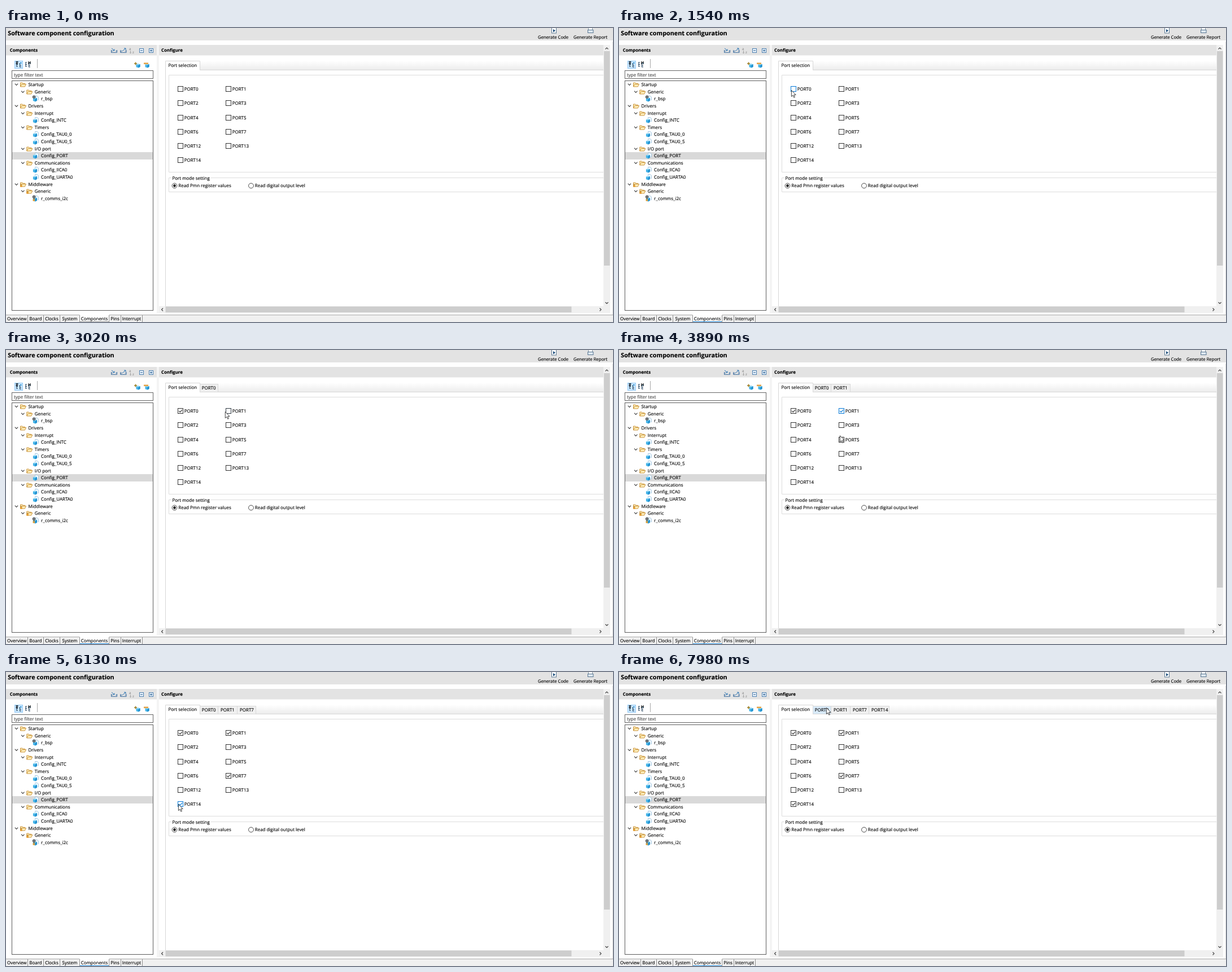
Animation of 1075x521 px, one loop 8 s. Source, as an HTML page:

```html
<!DOCTYPE html>
<html lang="en">
<head>
<meta charset="utf-8">
<title>Software component configuration</title>
<style>
html, body { margin: 0; width: 100%; height: 100%; overflow: hidden; background: #fff; }
svg { display: block; width: 100vw; height: 100vh; }
text { font: 7.95px "Open Sans", "Noto Sans", sans-serif; fill: #000; stroke: #000; stroke-width: .14px; text-rendering: geometricPrecision; white-space: pre; }
text.title { font-size: 10.8px; font-weight: 700; }
text.head { font-size: 7.8px; font-weight: 700; }
text.tool { font-size: 7.75px; }
text.mid { text-anchor: middle; }
text.hint { fill: #444; stroke: #444; }
text.sort { font-size: 6px; fill: #777; stroke: none; }
</style>
</head>
<body>
<svg id="stage" viewBox="0 0 1075 521" xmlns="http://www.w3.org/2000/svg">
  <defs>
    <linearGradient id="strip" x2="0" y2="1">
      <stop stop-color="#fff"/><stop offset="1" stop-color="#ececec"/>
    </linearGradient>
    <g id="folder" fill="#fff0bd" stroke="#c58a2b" stroke-width=".9" stroke-linejoin="round">
      <path d="M.5 8.5V1.5H4L5 2.8H8.7V4.2"/>
      <path d="M.5 8.5L2.8 4.2H10.5L8.4 8.5Z"/>
    </g>
    <g id="cube">
      <path d="M0 1.6L3.4 .2L7 1.2V6L3.8 7.6L0 6.2Z" fill="#45b4e8"/>
      <path d="M0 1.6L3.4 .2L7 1.2L3.8 2.8Z" fill="#a3dff8"/>
      <path d="M3.8 2.8L7 1.2V6L3.8 7.6Z" fill="#1f8fcf"/>
    </g>
    <g id="part">
      <path d="M3.6 2.2V.6H7.4L9.4 2.4V7.4H8" fill="#fff" stroke="#7fb2d6" stroke-width=".8"/>
      <use href="#cube" y="2.8"/>
    </g>
    <g id="tree" fill="none" stroke="#24435f" stroke-width="1">
      <path d="M1 1H4M1 4.5H4M1 8H4M2 1V8M6 3H7.5V9.5M7.5 6H10M7.5 9H10"/>
      <path d="M8 2H10.5" stroke="#2b8fd0" stroke-width="2"/>
    </g>
    <path id="tray" d="M.5 4V8.5H10.5V4M.5 8.5V6H3M10.5 6H8" fill="none" stroke="#3f6f9f"/>
  </defs>
  <g id="base"></g>
  <g id="tabs"></g>
  <g id="ports"></g>
  <path id="cursor" d="M.4 .4V11.5L3 9.2L4.8 13.2L6.5 12.4L4.8 8.5H8.2Z" fill="#fff" stroke="#222" stroke-width=".85"/>
</svg>
<script>
const LOOP = 8000;
const $ = id => document.getElementById(id);
const text = (x, y, s, cls = '') => `<text x="${x}" y="${y}" class="${cls}">${s}</text>`;
const rect = (x, y, w, h, fill, stroke = 'none') =>
  `<rect x="${x}" y="${y}" width="${w}" height="${h}" fill="${fill}" stroke="${stroke}"/>`;
const line = (d, stroke, width = 1) =>
  `<path d="${d}" fill="none" stroke="${stroke}" stroke-width="${width}"/>`;
const use = (id, x, y) => `<use href="#${id}" x="${x}" y="${y}"/>`;

// depth, label, marker
const TREE = [
  [0, 'Startup'], [1, 'Generic'], [2, 'r_bsp', 'info'],
  [0, 'Drivers'], [1, 'Interrupt'], [2, 'Config_INTC'],
  [1, 'Timers'], [2, 'Config_TAU0_0'], [2, 'Config_TAU0_5'],
  [1, 'I/O port'], [2, 'Config_PORT', 'selected'],
  [1, 'Communications'], [2, 'Config_IICA0'], [2, 'Config_UARTA0'],
  [0, 'Middleware', 'lock'], [1, 'Generic', 'lock'], [2, 'r_comms_i2c', 'both']
];

// hover start, check, tab shown, hover end; tab left and right edges
const PICKED = {
  0: { on: 1250, check: 1620, tab: 1760, off: 2600, x: 343.5, end: 375.5 },
  1: { on: 3010, check: 3260, tab: 3400, off: 4100, x: 375.5, end: 409.5 },
  7: { on: 4150, check: 4460, tab: 4600, off: 5420, x: 409.5, end: 442.5 },
  14: { on: 5500, check: 6120, tab: 6260, off: 7160, x: 442.5, end: 478.5 }
};
const PORTS = [0, 1, 2, 3, 4, 5, 6, 7, 12, 13, 14];

// time, x, y of the pointer tip
const PATH = [
  [290, 1007, 506], [420, 412, 306], [700, 412, 306], [930, 391, 148],
  [1150, 322, 98], [1440, 305, 110], [2370, 305, 110], [2700, 350, 111],
  [3090, 390, 109], [3800, 390, 109], [3890, 391, 151], [3990, 391, 181],
  [4090, 391, 181], [4240, 391, 190], [5080, 391, 190], [5200, 390, 199],
  [5280, 352, 220], [5500, 312, 231], [5950, 305, 233], [6050, 305, 233],
  [6250, 305, 236], [6920, 305, 236], [7020, 352, 130], [7300, 360, 84],
  [7670, 361, 76], [7770, 361, 76], [7980, 367, 63]
];

function treeRow([depth, label, mark], i) {
  const y = Math.round(100.2 + 12.6 * i), x = 15 + 11.3 * depth;
  let s = mark === 'selected' ? rect(11, y - 6, 249, 13, '#d9d9d9') : '';
  if (depth < 2) {
    s += line(`M${x + .8} ${y - 1.4}L${x + 3.5} ${y + 1.4}L${x + 6.2} ${y - 1.4}`, '#404040', 1.1);
    s += use('folder', x + 10, y - 4.5);
  } else s += use('part', x + 10.3, y - 5);
  if (mark === 'info' || mark === 'both')
    s += `<circle cx="${x + 12}" cy="${y - 2.8}" r="2.6" fill="#454b50"/>` + rect(x + 11.6, y - 4.2, .9, 2.8, '#fff');
  if (mark === 'lock' || mark === 'both')
    s += rect(x + 10, y + 1.6, 3.6, 3, '#e49b2d') + line(`M${x + 10.8} ${y + 1.6}v-1.6h2v1.6`, '#a96b12', .7);
  return s + text(x + 24.5, y + 3, label);
}

function toolbar() {
  const box = (x, plus) => rect(x, 36.5, 7, 7, '#eef6ff', '#4b7eae') +
    line(`M${x + 1.5} 40h4` + (plus ? `M${x + 3.5} 38v4` : ''), '#1d568b');
  return use('tray', 186, 35) + line('M187 36L192 40M192 37.4V40H189', '#2872b2') +
    use('tray', 202.5, 35) + line('M206 41L212 36M209 36H212V39', '#2872b2') +
    text(218, 39, 'a', 'sort') + text(224, 45, 'z', 'sort') +
    line('M220.5 40V45M219 43.5L220.5 45L222 43.5', '#888', .7) +
    box(236.5) + box(253.5, true) +
    rect(15.5, 58.5, 14, 13, '#cce8ff', '#90c8f6') + use('tree', 17, 60) +
    line('M17.5 60H21.5M17.5 63H21', '#111', 1.6) + use('tree', 33, 60) +
    line('M40 59V64M43 59V64M40 61.5H43', '#111', 1.2) +
    line('M55.5 55V71', '#a8a8a8') +
    use('cube', 230.5, 63) + line('M227 63h5M229.5 60.5v5', '#9b7c21', 1.5) +
    use('cube', 246.5, 63) + rect(244, 61.5, 8, 2.6, '#e2a246');
}

function scrollbars() {
  return rect(1058, 30, 12, 475, '#f0f0f0') + rect(1059, 41, 10.5, 380, '#cdcdcd') +
    rect(271, 493, 787, 12, '#f0f0f0') + rect(282.5, 493.5, 719, 10.5, '#cdcdcd') +
    line('M1061.5 37.5L1064 35L1066.5 37.5M1061.5 486L1064 488.5L1066.5 486', '#444', 1.2) +
    line('M278 496.5L275.5 499L278 501.5M1051.5 496.5L1054 499L1051.5 501.5', '#444', 1.2);
}

function bottomTabs() {
  const edges = [0, 38.5, 66.5, 95.5, 130.5, 182.5, 203.5, 241.5];
  const names = ['Overview', 'Board', 'Clocks', 'System', 'Components', 'Pins', 'Interrupt'];
  return rect(0, 508, 1075, 13, '#f0f0f0') + line('M0 508.5H1075', '#a9a9a9') +
    rect(130.5, 508, 52, 13, '#fff') +
    names.map((n, i) => line(`M${edges[i + 1]} 509V521`, '#909090') +
      text((edges[i] + edges[i + 1]) / 2, 518, n, 'mid')).join('') +
    '<path id="focus" d="M131 520.5H182" stroke-width="1"/>';
}

function radio(x, label, on) {
  return `<circle cx="${x}" cy="279.5" r="4.4" fill="#fff" stroke="#333" stroke-width=".9"/>` +
    (on ? `<circle cx="${x}" cy="279.5" r="2.4" fill="#222"/>` : '') + text(x + 6.8, 282.4, label);
}

$('base').innerHTML =
  rect(0, 0, 1075, 521, '#fff') + rect(0, 0, 1075, 22, '#e3e3e3') +
  text(3.2, 12.6, 'Software component configuration', 'title') +
  rect(966.5, -2, 8, 11, '#fff', '#5b7892') + `<path d="M969 2L973 4.8L969 7.5Z" fill="#174a78"/>` +
  rect(1031.5, -2, 7, 6, '#fff', '#8294a5') + rect(1030.5, 3.5, 9.5, 5, '#dbe6ef', '#5b7892') +
  text(942, 19, 'Generate Code', 'tool') + text(1005, 19, 'Generate Report', 'tool') +
  rect(0, 30, 267, 18.5, '#e3e3e3') + rect(271, 30, 787, 18.5, '#e3e3e3') +
  rect(267, 30, 4, 476, '#f4f4f4') +
  text(6.8, 42, 'Components', 'head') + text(275, 42, 'Configure', 'head') +
  toolbar() +
  rect(10.5, 75.5, 250, 14, '#fff', '#666') + text(14, 85.6, 'type filter text', 'hint') +
  rect(10.5, 93.5, 250, 407, '#fff', '#5c5c5c') + TREE.map(treeRow).join('') +
  rect(343.5, 58, 714.5, 16.5, 'url(#strip)') +
  line('M282.5 493V58.5H343.5V74.5H1058', '#d6d6d6') + text(287.5, 69, 'Port selection') +
  line('M1058 83.5H288.5V255.5H1058', '#dcdcdc') +
  line('M1058 265.5H363M292.5 265.5H288.5V290.5H1058', '#dcdcdc') +
  text(294.5, 268.6, 'Port mode setting') +
  radio(298.5, 'Read Pmn register values', true) + radio(434, 'Read digital output level') +
  scrollbars() + bottomTabs() + line('M1074.5 24V508', '#ddd');

$('tabs').innerHTML = Object.entries(PICKED).map(([n, p]) =>
  `<g id="tab${n}">` + rect(p.x, 60.5, p.end - p.x, 14, '#f0f0f0', '#d9d9d9') +
  text(p.x + (n === '0' ? 3.2 : 4.6), 70, 'PORT' + n) + '</g>').join('');

$('ports').innerHTML = PORTS.map((n, i) => {
  const x = 304.5 + 85 * (i % 2), y = Math.floor(103.7 + 25.2 * Math.floor(i / 2)) + .5;
  return `<g id="port${n}" stroke="#333">` +
    `<rect x="${x}" y="${y}" width="9" height="9" fill="#fff"/>` +
    `<path d="M${x + 1.7} ${y + 4.6}l2 2.1l3.9 -4.4" fill="none" stroke-width="1.15" visibility="hidden"/></g>` +
    text(x + 11.2, y + 7.5, 'PORT' + n);
}).join('');

const ramp = (t, start, span) => Math.max(0, Math.min(1, (t - start) / span));
const slope = (i, k) => (PATH[i + 1][k] - PATH[i][k]) / (PATH[i + 1][0] - PATH[i][0]);

// Harmonic mean of neighbouring slopes keeps the curve free of overshoot.
function tangent(i, k) {
  if (i === 0 || i === PATH.length - 1) return 0;
  const a = slope(i - 1, k), b = slope(i, k);
  return a * b > 0 ? 2 * a * b / (a + b) : 0;
}

function pointer(t, k) {
  const last = PATH.length - 1;
  if (t >= PATH[last][0]) return PATH[last][k];
  const i = PATH.findIndex((p, j) => t < PATH[j + 1][0]);
  const a = PATH[i], b = PATH[i + 1], d = b[0] - a[0], u = (t - a[0]) / d;
  const s = u * u * (3 - 2 * u);
  return a[k] + (b[k] - a[k]) * s + d * u * (1 - u) * (tangent(i, k) * (1 - u) - tangent(i + 1, k) * u);
}

const show = (el, on) => el.setAttribute('visibility', on ? 'visible' : 'hidden');
const mix = (a, b, k) => `rgb(${a.map((v, i) => Math.round(v + (b[i] - v) * k))})`;

function draw(t) {
  for (const n in PICKED) {
    const p = PICKED[n], port = $('port' + n);
    const glow = ramp(t, p.on, 120) - ramp(t, p.off, 120);
    port.setAttribute('stroke', mix([51, 51, 51], [0, 120, 215], glow));
    show(port.lastChild, t >= p.check);
    show($('tab' + n), t >= p.tab);
  }
  $('tab0').firstChild.setAttribute('fill', mix([240, 240, 240], [216, 234, 249], ramp(t, 7790, 110)));
  $('focus').setAttribute('stroke', t < 1540 ? '#909090' : '#1683d8');
  const visible = t >= PATH[0][0];
  show($('cursor'), visible);
  if (visible) $('cursor').setAttribute('transform', `translate(${pointer(t, 1)} ${pointer(t, 2)})`);
}

const start = performance.now();
function tick() {
  draw((performance.now() - start) % LOOP);
  requestAnimationFrame(tick);
}
tick();
</script>
</body>
</html>
```
